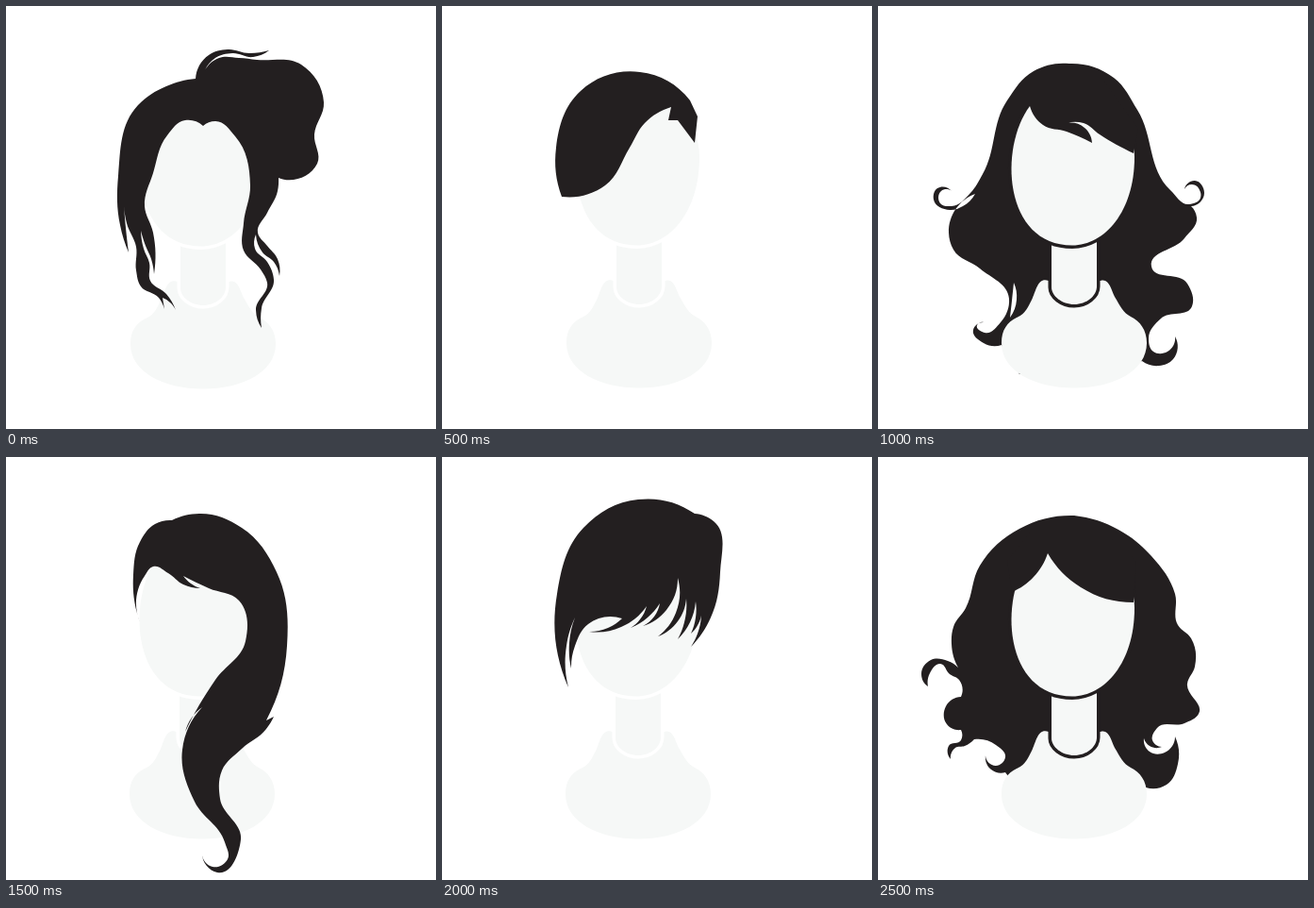
These frames come from a looping animation (456x448 px, 3000 ms). An HTML page:

```html
<!DOCTYPE html>
<html lang="en">
<head>
<meta charset="utf-8">
<title>Hairstyles</title>
<style>
  html, body { margin: 0; width: 100%; height: 100%; overflow: hidden; background: #fff; }
  svg { display: block; width: 456px; height: 448px; }
  #back, #front { fill: #231f20; }
  #back { fill-rule: evenodd; }
  #bust { fill: #f6f8f7; }
  .gap { stroke-width: 7; paint-order: stroke; }
</style>
</head>
<body>
<svg viewBox="0 0 456 448">
  <path id="back"/>
  <g id="bust">
    <path d="M181 291C170 287 168 300 164 309C157 324 154 327 147 330C137 335 131 343 131 357
      C131 386 165 404.5 208 404.5S285 386 285 357C285 343 278 334 268 329
      C260 325 257 318 251 308C247 300 245 288 236 291Z"/>
    <path class="gap" d="M184 240V298C184 307 195 316 208 316S232 307 232 297V240Z"/>
    <path class="gap" d="M161 106C128 150 133 253.5 206 253.5C240 253.5 272 218 272 160
      C272 122 245 95 206 95Q172 95 161 106Z"/>
  </g>
  <path id="front"/>
</svg>
<script>
  const STEP = 500;

  // Closed outline through "x,y" points: smooth along each run, with a corner at every "/".
  function trace(text) {
    let last, d = "";
    for (const run of text.split("/")) {
      const pts = run.trim().split(/\s+/).map(p => p.split(",").map(Number));
      if (last) pts.unshift(last);
      else d = "M" + pts[0];
      last = pts.at(-1);
      d += smooth(pts);
    }
    return d + "Z";
  }

  // Tangents turn in proportion to chord length, so evenly bent runs become arcs.
  function smooth(pts) {
    const chords = pts.slice(1).map(([x, y], i) => {
      const dx = x - pts[i][0], dy = y - pts[i][1];
      return { angle: Math.atan2(dy, dx), length: Math.hypot(dx, dy) };
    });
    const n = chords.length;
    if (n < 2) return n ? "L" + pts[1] : "";
    const tangent = [];
    for (let i = 1; i < n; i++) {
      const a = chords[i - 1], b = chords[i], turn = b.angle - a.angle;
      tangent[i] = a.angle + Math.atan2(Math.sin(turn), Math.cos(turn)) * a.length / (a.length + b.length);
    }
    tangent[0] = 2 * chords[0].angle - tangent[1];
    tangent[n] = 2 * chords[n - 1].angle - tangent[n - 1];
    const handle = (i, reach) => [
      pts[i][0] + reach * Math.cos(tangent[i]),
      pts[i][1] + reach * Math.sin(tangent[i])
    ];
    return chords.map(({ length }, i) =>
      `C${handle(i, length * 0.36)} ${handle(i + 1, -length * 0.36)} ${pts[i + 1]}`).join("");
  }

  const bun = trace(`201,77 215,52 235,46 258,50 279,47 / 262,54 240,50 222,55 211,68
    / 226,55 247,55 266,57 313,62 337,102 327,136 330,167 289,182`);

  const looseLocks = trace(`230,70 / 289,182 / 288,196 277,219 267,240 277,254 288,268 290,286
    / 284,271 272,261 265,242 / 264,257 277,271 284,290 271,320 271,341
    / 265,322 277,293 270,279 252,259 252,230 259,190 243,138 222,122 209,127
    / 190,121 171,137 156,177 147,212 156,240 157,284 / 154,268 148,254 143,238
    / 146,257 152,272 153,291 170,305 180,322 / 174,314 166,309 / 168,321
    / 162,309 143,297 138,280 138,255 128,230 125,211 / 127,235 130,261
    / 121,232 119,180 140,105 170,85 201,77`);

  const sideSweep = trace(`127,202 121,150 147,90 210,70 263,100 / 271,117 / 268,145 / 250,121
    / 240,121 / 243,107 / 215,124 199,150 173,190 127,202`);

  const waves = trace(`203,61 250,76 275,110 310,195 330,210 342,203 341,195 / 333,189 325,194
    / 336,185 346,198 332,212 / 338,224 325,246 290,276 328,294 333,318 300,331 287,352 292,366
    307,366 315,350 / 313,374 298,381 280,376 / 240,390 / 150,390 / 131,359
    / 112,357 101,343 112,335 / 105,338 113,346 130,335 139,310 108,278 80,258 75,240 103,199
    / 90,212 76,216 59,205 63,193 78,196 / 67,196 66,209 78,212 98,198 111,178 137,100 165,69 203,61`);

  const slit = trace("144,293 142,312 140,330 / 147,311 144,293");

  const sweptFringe = trace(`161,106 175,126 200,133 227,145 / 219,129 200,124
    / 218,124 235,136 271,156 / 276,130 / 240,80 / 161,80`);

  const longLock = trace(`142,175 135,125 142,90 158,71 176,67 / 205,60 250,75 287,122 298,200 276,279
    / 284,275 / 276,288 250,309 229,332 227,362 249,405 224,440 208,420
    / 219,434 235,426 232,408 200,365 187,310 208,265 / 197,276 190,291
    / 222,236 254,195 247,152 215,139 188,126 / 196,134 206,139
    / 188,135 172,123 156,116 147,126 142,175`);

  const choppy = trace(`134,244 122,145 150,75 208,45 268,60 / 288,68 295,122 285,170 264,201
    / 271,187 275,168 / 270,180 264,187 / 269,170 269,153 / 263,175 250,193 / 257,175 259,150
    / 250,174 229,190 / 248,165 250,128 / 238,162 213,179 / 225,169 231,155 / 218,170 200,181
    / 210,172 217,158 / 190,180 156,185 / 176,181 191,171 / 155,177 141,200 137,224
    / 135,197 141,170 / 132,200 134,244`);

  const curls = trace(`208,62 255,77 290,105 315,145 318,178 332,192 336,222 328,240 340,272
    325,282 296,287 291,300 301,307 / 288,306 282,298 / 288,312 304,313 315,296
    / 318,325 306,347 284,350 / 240,380 / 170,380 / 135,334 / 120,331 114,316
    / 125,327 135,318 125,305 102,299 / 92,306 82,308 77,320 / 75,306 88,300 88,289
    / 73,283 72,264 88,254 / 86,236 76,230 66,219 55,229 53,243 / 46,230 56,215 74,216 85,223
    / 78,198 80,180 93,160 108,115 150,76 208,62`);

  const parting = trace(`142,143 165,127 180,102 / 215,138 271,154 / 274,110 / 240,80 / 161,80 / 137,110`);

  const styles = [
    { front: bun + looseLocks, shift: "1 1" },
    { front: sideSweep, shift: "1 0" },
    { back: waves + slit, front: sweptFringe },
    { front: longLock },
    { front: choppy },
    { back: curls, front: parting }
  ];

  const [backHair, bust, frontHair] = ["back", "bust", "front"].map(id => document.getElementById(id));
  const gaps = document.querySelectorAll(".gap");

  function draw() {
    const { back = "", front, shift = "0 0" } = styles[Math.floor(performance.now() / STEP) % styles.length];
    backHair.setAttribute("d", back);
    frontHair.setAttribute("d", front);
    bust.setAttribute("transform", `translate(${shift})`);
    gaps.forEach(part => part.setAttribute("stroke", back ? "#231f20" : "#fff"));
    requestAnimationFrame(draw);
  }
  draw();
</script>
</body>
</html>
```
